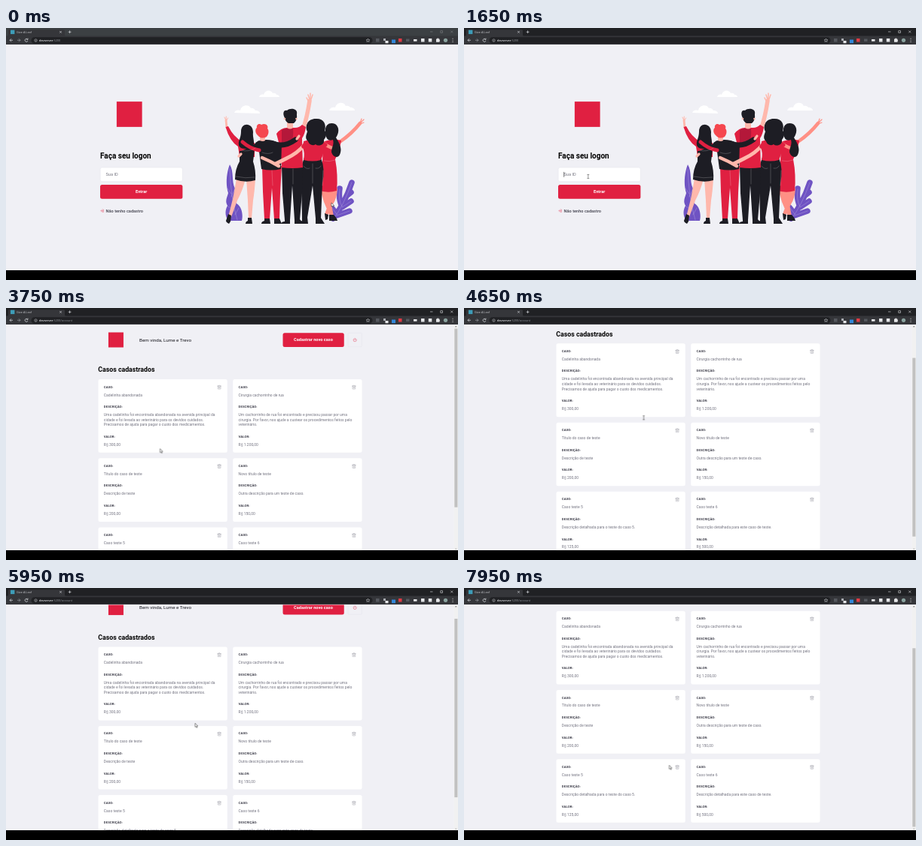
Animation of 600x336 px, one loop 8000 ms. Source, as an HTML page:

```html
<!DOCTYPE html>
<html lang="pt-BR">
<head>
<meta charset="utf-8">
<title>Give A Leaf</title>
<style>
@property --scroll { syntax: '<number>'; inherits: true; initial-value: 0; }
* { box-sizing: border-box; margin: 0; padding: 0; }
html, body { width: 100%; height: 100%; overflow: hidden; background: #000; }
body { position: relative; }
:root { --red: #e02041; --line: #dcdce6; --loop: 8s; }

/* Laid out at 1920 px wide, shown at 600 px */
.stage {
  position: absolute; width: 1920px; height: 1075.2px; overflow: hidden; background: #f0f0f5;
  transform: scale(.3125); transform-origin: 0 0;
  font: 400 16px Roboto, Arial, sans-serif;
}
.stage > svg, .login > svg { position: absolute; left: 0; top: 0; width: 1920px; height: 1075.2px; }
.login > svg { top: -72px; }
.view { position: absolute; top: 72px; left: 0; width: 1920px; height: 963px; overflow: hidden; background: #f0f0f5; }
.icon { fill: none; stroke: currentColor; stroke-width: 2; stroke-linecap: round; stroke-linejoin: round; }
.mark { background: var(--red); }
.button {
  height: 60px; background: var(--red); border-radius: 8px; color: #fff;
  font-weight: 700; font-size: 18px; line-height: 60px; text-align: center;
}

/* Login */
.login > div, .login > h1 { position: absolute; left: 400px; width: 350px; }
.login .mark { left: 470px; top: 242px; width: 108px; height: 108px; }
.login h1 { top: 454px; font-size: 32px; line-height: 38px; }
.field {
  top: 523px; height: 60px; padding: 0 23px; background: #fff; border: 1px solid var(--line);
  border-radius: 8px; font-size: 18px; line-height: 58px; color: #333;
}
.field .hint { position: absolute; color: #757580; animation: hint var(--loop) step-end infinite; }
.typed { text-decoration: underline wavy #e4525f 1px; }
.typed i {
  font-style: normal; font-size: 0;
  animation: key var(--loop) step-end calc(var(--i) * 95ms) infinite;
}
.caret {
  display: inline-block; width: 2px; height: 22px; background: #222; vertical-align: -5px;
  visibility: hidden; animation: caret var(--loop) step-end infinite;
}
.login .button { top: 597px; }
.login .link { top: 696px; font-size: 18px; font-weight: 500; line-height: 24px; color: #41414d; }
.link svg { width: 16px; height: 16px; margin-right: 8px; color: var(--red); vertical-align: -2px; }

/* Profile */
.profile { visibility: hidden; animation: profile var(--loop) step-end infinite, scroll var(--loop) linear infinite; }
.page { position: absolute; left: 391.5px; top: 32px; width: 1120px; transform: translateY(calc(var(--scroll) * -1px)); }
header { display: flex; align-items: center; height: 64px; }
header .mark { width: 64px; height: 64px; margin: 0 43.5px; }
header span { margin-left: 24px; font-size: 20px; color: #16161c; }
header .button { width: 260px; margin-left: auto; }
.power {
  width: 60px; height: 60px; margin-left: 16px; border: 1px solid var(--line); border-radius: 4px;
  color: var(--red); display: grid; place-items: center;
}
.power svg { width: 18px; }
.page h1 { margin: 80px 0 24px; font-size: 28px; line-height: 32px; }
ul { display: grid; grid-template-columns: 1fr 1fr; gap: 24px; list-style: none; }
li { position: relative; padding: 24px; border-radius: 8px; background: #fff; }
li strong { display: block; margin-bottom: 16px; font-size: 14px; line-height: 16px; color: #41414d; }
li p { white-space: pre; line-height: 21px; color: #737380; }
li p + strong { margin-top: 32px; }
li svg { position: absolute; right: 24px; top: 24px; width: 20px; height: 20px; color: #a0a0ab; }
.bar { position: absolute; right: 0; top: 0; width: 17px; height: 100%; background: #f1f1f1; }
.thumb {
  position: absolute; left: 2px; top: 16px; width: 13px; height: 762px; background: #c1c1c1;
  transform: translateY(calc(var(--scroll) * .82px));
}
.bar::before, .bar::after { content: ''; position: absolute; left: 4px; border: 4.5px solid transparent; }
.bar::before { top: 1px; border-bottom-color: #505050; }
.bar::after { bottom: 1px; border-top-color: #a3a3a3; }

/* Browser and pointer */
.ui { font: 3.9px 'Open Sans', Arial, sans-serif; }
.host { fill: #e8eaed; font-weight: 600; }
.port { fill: #91969c; font-weight: 400; }
.route { visibility: hidden; animation: profile var(--loop) step-end infinite; }
.strip { animation: strip var(--loop) step-end infinite; }
.controls { animation: focus var(--loop) step-end infinite; }
.pointer { animation: pointer var(--loop) ease-in-out infinite; }
.arrow { animation: arrow var(--loop) step-end infinite; }
.beam { animation: beam var(--loop) step-end infinite; }
.hand { animation: hand var(--loop) step-end infinite; }

@keyframes hint { 0% { visibility: inherit; } 21.5%, 100% { visibility: hidden; } }
@keyframes key { 0% { font-size: 0; } 21.5% { font-size: 18px; } 60%, 100% { font-size: 0; } }
@keyframes caret { 0% { visibility: hidden; } 19% { visibility: inherit; } 40%, 100% { visibility: hidden; } }
@keyframes profile { 0% { visibility: hidden; } 40%, 100% { visibility: visible; } }
@keyframes strip { 0% { fill: #3c4043; } 15%, 100% { fill: #202124; } }
@keyframes focus { 0% { opacity: .4; } 15%, 100% { opacity: 1; } }
@keyframes scroll {
  0%, 56% { --scroll: 0; }
  58.125% { --scroll: 152; }
  59.5%, 72.5% { --scroll: 206; }
  74.375% { --scroll: 53; }
  75.75%, 92% { --scroll: 0; }
  94%, 96% { --scroll: 100; }
  98%, 100% { --scroll: 206; }
}
@keyframes pointer {
  0% { transform: translate(432px, 233px); }
  9%, 12% { transform: translate(6px, 190.5px); }
  19%, 33.5% { transform: translate(164.8px, 198px); }
  37%, 43.5% { transform: translate(180px, 217px); }
  51%, 65% { transform: translate(238.6px, 146.3px); }
  69%, 89% { transform: translate(251px, 180.3px); }
  96%, 100% { transform: translate(272.4px, 236.3px); }
}
@keyframes arrow {
  0% { visibility: visible; }
  17% { visibility: hidden; }
  40% { visibility: visible; }
  49% { visibility: hidden; }
  66%, 100% { visibility: visible; }
}
@keyframes beam {
  0% { visibility: hidden; }
  17% { visibility: visible; }
  35.5% { visibility: hidden; }
  49% { visibility: visible; }
  66%, 100% { visibility: hidden; }
}
@keyframes hand { 0% { visibility: hidden; } 35.5% { visibility: visible; } 40%, 100% { visibility: hidden; } }

/* Illustration */
.art { stroke-linecap: round; stroke-linejoin: round; --ink: #1d1d24; --skin: #ffb8ac; --tan: #ff9085; --leaf: #6f53c3; }
.ink { fill: var(--ink); } .rose { fill: var(--red); } .wine { fill: #b4183a; }
.skin { fill: var(--skin); } .tan { fill: var(--tan); } .leaf { fill: var(--leaf); }
.limb { fill: none; stroke: var(--skin); }
.limb.ink { stroke: var(--ink); } .limb.rose { stroke: var(--red); }
.limb.tan { stroke: var(--tan); } .limb.leaf { stroke: var(--leaf); }
.limb.ink, .limb.rose, .limb.tan, .limb.leaf { fill: none; }
.seam { fill: none; stroke: #fff; stroke-width: .4; opacity: .5; }
</style>
</head>
<body>
<div class="stage">
  <section class="view login">
    <div class="mark"></div>
    <h1>Faça seu logon</h1>
    <div class="field"><span class="hint">Sua ID</span><span class="typed"></span><span class="caret"></span></div>
    <div class="button">Entrar</div>
    <div class="link"><svg class="icon" viewBox="0 0 24 24"><path d="M15 3h4a2 2 0 0 1 2 2v14a2 2 0 0 1-2 2h-4M10 17l5-5-5-5M15 12H3"/></svg>Não tenho cadastro</div>

    <svg class="art" viewBox="0 0 600 336">
      <g fill="#fff">
        <path d="M303 113c1-4 6-4 8-3 1-8 12-9 14-3 4-1 5 2 6 3 4 0 6 2 6 4z"/>
        <path d="M336 92c1-3 4-4 6-3 2-7 10-7 12-2 4-1 5 2 5 2 3 0 4 2 4 3z"/>
        <path d="M429 110c1-4 5-5 8-4 2-8 12-8 14-2 4-1 6 2 6 2 4 0 6 2 6 4z"/>
      </g>
      <path class="leaf" d="M297 182C303 192 299 204 304 214C302 220 307 228 306 234C313 238 315 249 313 257H295C290 250 291 242 294 237C290 230 294 225 295 220C291 208 293 192 297 182Z"/>
      <path class="limb leaf" stroke-width="7.500" d="M434 254Q449 236 459 206M446 238Q441 228 443 214M439 248L432 239M453 223L458 219M446 239L458 231M439 250L456 244"/>
      <path class="seam" d="M297 188Q298 225 307 256M294 214l5 7M303 216l-4 9M295 238l8 6M309 240l-5 9M459 206Q449 236 433 257M443 215Q441 229 446 238M458 231l-12 8M432 239l7 9M456 244l-17 6"/>

      <!-- woman, far left -->
      <g>
        <path class="skin" d="M306 201H318Q314 217 307 230L299 252H295L301 228ZM319 201H331Q330 218 328 230L326 254H322L321 230Z"/>
        <path class="limb" stroke-width="2.800" d="M292 123L293 133"/>
        <path class="limb" stroke-width="1" d="M292 123l-2-4M292 122l.3-4M293 123l1.500-3"/>
        <path class="rose" d="M291.500 132L295 131Q302 145 313 151L330 153V172H310Q309 164 308 158Q297 151 291.500 132Z"/>
        <path class="ink" d="M310 164L330 162L328 178Q332 190 331 203Q318 207 304 202Q304 188 310 178Z"/>
        <path class="ink" d="M312 138C312 125 328 126 328 139C327 146 331 152 328 158C323 163 310 162 309 156C308 150 312 147 312 138Z"/>
        <path class="ink" d="M295 248l4 2-1 8-2 3q-4-2-4-4zM321 253h5l1 8h-9q0-3 3-4z"/>
      </g>

      <!-- woman in dress -->
      <g>
        <path class="tan" d="M417 214H429L431 230L435 251H430L422 232ZM429 214H440Q439 228 434 235L427 250L423 248L429 232Z"/>
        <path class="limb tan" stroke-width="4.500" d="M470 127Q459 141 443 152"/>
        <path class="limb tan" stroke-width="1.200" d="M470 127l2-6M471 126l4-4M470 128l5-2"/>
        <path class="rose" d="M421 152Q434 146 445 150Q443 163 437 175Q441 196 439 217Q426 221 415 216Q417 194 420 178Z"/>
      </g>

      <!-- woman in trousers -->
      <g>
        <path class="ink" d="M396 173H418Q424 188 420 207L418 254H411L407 210L400 253H393L392 206Q389 189 396 173Z"/>
        <path class="rose" d="M395 151Q407 146 422 151Q424 163 418 176Q407 179 395 176Q397 166 394 160Z"/>
        <path class="limb tan" stroke-width="4.500" d="M422 154Q430 160 440 162"/>
        <path class="limb rose" stroke-width="5" d="M419 153l5 3"/>
        <path class="ink" d="M401 151C396 147 399 142 400 138C396 130 401 121 411 121C421 120 426 128 423 137C427 141 424 147 422 149C423 157 414 158 411 155C407 158 402 155 401 151Z"/>
        <path class="ink" d="M393 252h7l1 9h-10q-1-3 2-4zM411 253h7l5 8h-12z"/>
      </g>
      <path class="ink" d="M424 142C422 128 430 125 437 128C444 133 441 142 438 146C442 153 447 160 443 169C440 175 433 171 432 165C432 159 436 156 434 149Q426 152 424 142ZM429 249h6q4 4 5 8h-11zM423 247l5 2-1 6-3 1z"/>

      <!-- man -->
      <g>
        <path class="ink" d="M366 183H394L393 220L390 256H383L380 210L377 256H370L367 220Z"/>
        <path class="limb" stroke-width="5.500" d="M403 97Q400 118 394 136"/>
        <path class="limb" stroke-width="1.500" d="M403 95l-2-6M404 94l0-7M405 95l2-6M401 97l-2-4"/>
        <path class="rose" d="M359 141Q365 133 373 133H384Q389 133 393 129L398 132Q397 141 393 147L394 186Q380 188 366 186L364 160Z"/>
        <path class="wine" d="M366 136Q373 132 381 134Q382 145 379 153H366Z"/>
        <path class="skin" d="M373 123h8v10q-4 3-8 0z"/>
        <path class="ink" d="M370 120C366 112 370 109 373 110C377 106 388 107 386 115Q387 123 382 127H375Q371 125 370 120Z"/>
        <circle class="skin" cx="370" cy="121" r="1.300"/><circle class="skin" cx="385.500" cy="121" r="1.300"/>
        <path class="ink" d="M370 255h7v6h-12q1-3 5-3zM383 255h7l5 6h-12z"/>
      </g>

      <!-- person in black shirt -->
      <g>
        <path class="rose" d="M340 184H366L364 220L363 255H356L353 213L350 255H343L341 218Z"/>
        <path class="ink" d="M331 153Q341 147 354 150L366 154L365 188Q352 191 339 188L336 165Z"/>
        <path class="limb ink" stroke-width="7" d="M336 154Q328 162 314 167"/>
        <path class="limb ink" stroke-width="7" d="M354 154Q369 160 384 149"/>
        <path class="limb" stroke-width="3.200" d="M386 148l3-4M312 168l-3 3"/>
        <path class="limb rose" stroke-width="5" d="M314 152Q324 161 336 163"/>
        <path class="skin" d="M337 144h7v6q-3 2-7 0z"/>
        <path fill="#f5474f" d="M334 143C330 139 331 134 333 133C332 128 337 127 339 129C344 126 349 130 347 134C350 137 348 143 346 145Q339 149 334 143Z"/>
        <path class="ink" d="M343 254h7l1 7h-12q0-3 4-4zM356 254h7l3 7h-10z"/>
      </g>

      <!-- embracing arms -->
      <path class="limb" stroke-width="5" d="M397 155Q387 167 372 174L358 181"/>
      <path class="limb" stroke-width="4.500" d="M340 173Q352 178 362 184"/>
      <path class="limb rose" stroke-width="5.500" d="M398 154l-3 4"/>
      <path class="seam" d="M305 198q13 3 25 1M353 190l1 20M381 188v20M395 184q4 5 8 3M411 187q5 1 7-3M407 181v26M437 176q-8 3-15 1M421 190l-1 20M340 166q8 3 14 0M313 163q8 3 18-3"/>
    </svg>
  </section>

  <section class="view profile">
    <div class="page">
      <header>
        <div class="mark"></div><span>Bem vinda, Lume e Trevo</span>
        <div class="button">Cadastrar novo caso</div>
        <div class="power"><svg class="icon" viewBox="0 0 24 24"><path d="M18.4 6.6a9 9 0 1 1-12.8 0M12 2v10"/></svg></div>
      </header>
      <h1>Casos cadastrados</h1>
      <ul></ul>
    </div>
    <div class="bar"><div class="thumb"></div></div>
  </section>

  <svg class="ui" viewBox="0 0 600 336">
    <path class="strip" d="M0 0h600v12H0z"/>
    <path fill="#35363a" d="M0 10.6H2Q3 10.6 3 9V3.5Q3 2.2 4.5 2.2H76.5Q78 2.2 78 3.5V9Q78 10.6 79.5 10.6H600V22H0Z"/>
    <rect x="33.500" y="12.200" width="453" height="8.600" rx="4.300" fill="#202124"/>
    <rect x="6" y="2.700" width="5.400" height="5.400" fill="#3d9db8"/>
    <text x="14" y="6.900" fill="#c8cbcf">Give A Leaf</text>
    <text x="44" y="17.800" class="host">devserver<tspan class="port">:5200<tspan class="route">/account</tspan></tspan></text>
    <g fill="none" stroke="#dfe1e5" stroke-width=".7">
      <path d="M71.300 4.200l2.400 2.400m0-2.400l-2.400 2.400M82.700 5.300h3.800m-1.900-1.900v3.800"/>
      <path d="M9 16.300H5m2-2l-2 2 2 2"/>
      <path stroke="#9a9da2" d="M15 16.300h4m-2-2l2 2-2 2"/>
      <path d="M28.600 15a2 2 0 1 0 .4 2M29 13.700v1.700h-1.700"/>
      <circle cx="39.500" cy="16.500" r="1.700" stroke-width=".5"/><path stroke-width=".5" d="M39.500 16.300v1.200"/>
      <path stroke-width=".5" d="M480.500 14.100l.7 1.600 1.700.1-1.300 1.100.4 1.700-1.500-.9-1.500.9.400-1.700-1.300-1.100 1.700-.1z"/>
      <path class="controls" stroke-width=".6" d="M563 5h3.500M576.800 3.700h2.700v2.700h-2.700zM590.200 3.500l3 3m0-3l-3 3"/>
    </g>
    <g fill="#e6e7e9">
      <path d="M551 14h4.500v4.500H551zM560.800 14h4.500v4.500h-4.500zM503.500 17h4v3.300h-4zM541 15h4.500v2.800H541z"/>
      <path d="M571 14.500h1.300a1 1 0 0 1 2 0h1.200v1.400a1 1 0 0 1 0 1.800v1.100H571z"/>
      <path fill="#55585e" d="M491 14h4.500v4.500H491zM531 14.500h4.500v3.500H531z"/>
      <path fill="#a8abb0" d="M501 14h3v3h-3z"/>
      <path fill="#3286d8" d="M512 15.500h5v4.700h-5z"/>
      <path fill="#e23b45" d="M521 14h4.500v4.500H521z"/>
      <circle cx="583.500" cy="16.300" r="2.600" fill="#8aa39f"/>
      <path d="M592.600 13.800h.9v.9h-.9zM592.600 15.900h.9v.9h-.9zM592.600 18h.9v.9h-.9z"/>
    </g>
    <path d="M0 323h600v13H0z"/>
    <g class="pointer">
      <path class="arrow" fill="#fff" stroke="#222" stroke-width=".5" d="M0 0V5.200L1.200 4.100 2 6 2.900 5.600 2.100 3.800H3.700Z"/>
      <path class="beam" fill="none" stroke="#333" stroke-width=".55" d="M-1.300-2.600H1.300M0-2.600V2.600M-1.300 2.600H1.300"/>
      <path class="hand" fill="#fff" stroke="#222" stroke-width=".45" d="M-.6 0Q0-.7.6 0V2.300L3 2.900V4.800L2.300 6H-.6L-2.200 3.600-1.600 3-.6 3.700Z"/>
    </g>
  </svg>
</div>

<script>
const cases = [
  ['Cadelinha abandonada', 'Uma cadelinha foi encontrada abandonada na avenida principal da\ncidade e foi levada ao veterinário para os devidos cuidados.\nPrecisamos de ajuda para pagar o custo dos medicamentos.', '300,00'],
  ['Cirurgia cachorrinho de rua', 'Um cachorrinho de rua foi encontrado e precisou passar por uma\ncirurgia. Por favor, nos ajude a custear os procedimentos feitos pelo\nveterinário.', '1.200,00'],
  ['Título do caso de teste', 'Descrição de teste', '200,00'],
  ['Novo título de teste', 'Outra descrição para um teste de caso.', '150,00'],
  ['Caso teste 5', 'Descrição detalhada para o teste do caso 5.', '125,00'],
  ['Caso teste 6', 'Descrição detalhada para este caso de teste.', '500,00'],
];
const trash = '<svg class="icon" viewBox="0 0 24 24"><path d="M3 6h18M19 6v14a2 2 0 0 1-2 2H7a2 2 0 0 1-2-2V6m3 0V4a2 2 0 0 1 2-2h4a2 2 0 0 1 2 2v2M10 11v6M14 11v6"/></svg>';
const row = (label, value) => `<strong>${label}:</strong><p>${value}</p>`;

document.querySelector('ul').innerHTML = cases.map(([title, text, value]) =>
  `<li>${row('CASO', title)}${row('DESCRIÇÃO', text)}${row('VALOR', 'R$ ' + value)}${trash}</li>`).join('');
document.querySelector('.typed').innerHTML = [...'c47dbe9a'].map((key, i) =>
  `<i style="--i:${i}">${key}</i>`).join('');
</script>
</body>
</html>
```
